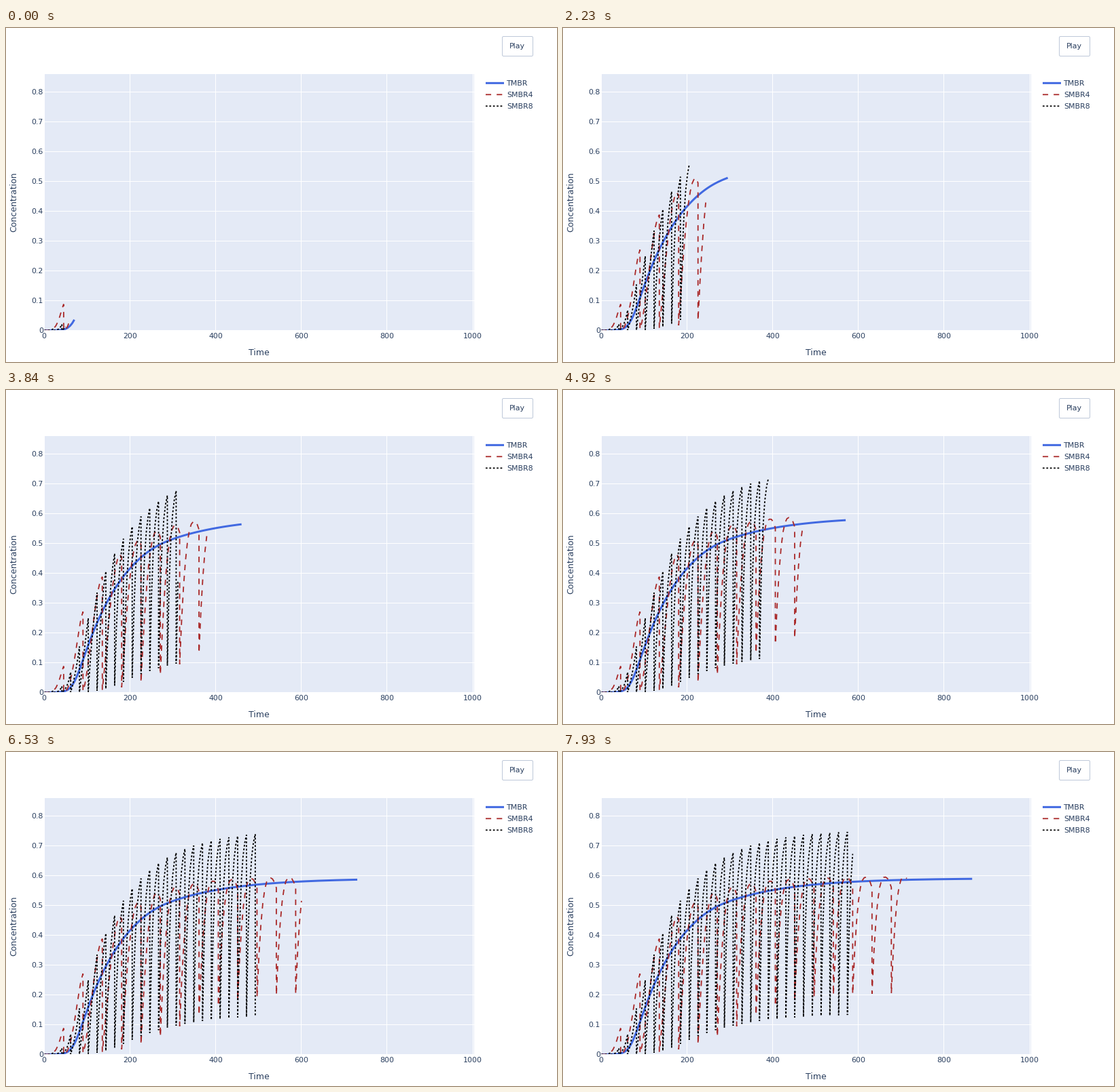
Recreate the animation shown at these times as a matplotlib script. Size 811 px wide and 493 px high, loop 8000 ms.

```python
import numpy as np
import matplotlib.pyplot as plt
from matplotlib.animation import FuncAnimation
from matplotlib.patches import FancyBboxPatch, Rectangle

W, H, DPI = 811, 493, 64
PT = 72 / DPI                # points per pixel
LOOP, TICKS, STEPS = 8000, 400, 104
INK = "#2a3f5f"
ZOOM = 0.9                   # page zoom
LEFT, TOP, RIGHT, BOTTOM = 56, 68, 689, 446

plt.rcParams["font.family"] = "DejaVu Sans"
fig = plt.figure(figsize=(W / DPI, H / DPI), dpi=DPI, facecolor="white")
ax = fig.add_axes([0, 0, 1, 1])
ax.set_xlim(0, W)
ax.set_ylim(H, 0)
ax.axis("off")


def px(t):
    return 56.4 + 0.631 * t


def py(v):
    return 446.4 - 440 * v


def label(x, y, s, size=11, va="baseline", **kw):
    ax.text(x, y, s, fontsize=size * PT, color=INK, va=va, **kw)


def ramp(x, width):
    """Zero, then a straight rise, with a rounded corner at x = 0."""
    return width * np.logaddexp(0, x / width)


def settle(x):
    return 1 - np.exp(-x)


# ---- data ----
def steady_curve():
    t = np.arange(0, 901, 5.0)
    return t, 0.591 * settle(0.0093 * ramp(t - 69, 9) - 0.0028 * ramp(t - 265, 15))


def cycles(period, steps, count, shape):
    """Repeated fill cycles, each ending in a sudden drop."""
    s = np.linspace(0, 1, steps + 1)
    cycle = range(1, count + 1)
    return (np.concatenate([(m - 1 + s) * period for m in cycle]),
            np.concatenate([shape(m, s) for m in cycle]))


def shape4(m, s):
    """S-shaped rise to a peak that comes earlier each cycle, then a sag."""
    high = 0.596 - 0.508 * 0.64 ** (m - 1)
    low = 0.205 / (1 + np.exp((8.2 - m) / 1.35)) if m > 2 else 0
    late = max(m - 3, 0)
    peak = 0.66 + 0.34 * np.exp(-late / 4.5)
    sag = 0.036 * settle(late / 3.5)
    bend = 1 + 3 * np.exp(-0.95 * (m - 1))
    power = 2.8 - 1.4 * np.exp(-(m / 5.5) ** 2)
    rise = 1 - (1 - np.minimum(s / peak, 1) ** bend) ** power
    fall = np.maximum(s - peak, 0) / (1.0001 - peak)
    return low + (high - low) * rise - sag * fall ** 2


def shape8(m, s):
    """Exponential rise, convex in early cycles and concave later."""
    high = 0.753 * settle(0.189 * ramp(m - 2.9, 0.65))
    low = 0.138 * settle(0.155 * ramp(m - 8.2, 1))
    a = 3 - 9 * np.exp((1 - m) / 3.5)
    return low + (high - low) * settle(a * s) / settle(a)


curves = [(px(t), py(v)) for t, v in (steady_curve(),
                                      cycles(45.1, 10, 16, shape4),
                                      cycles(20.5, 5, 29, shape8))]

# ---- plot area ----
area = dict(xy=(LEFT, TOP), width=RIGHT - LEFT, height=BOTTOM - TOP)
ax.add_patch(Rectangle(**area, fc="#e4eaf6", lw=0))
times = np.arange(0, 1001, 200)
levels = np.arange(9)
grid = dict(color="white", lw=PT, snap=False, zorder=1.5)
ax.vlines(np.floor(px(times) - 0.35) + 0.5, TOP, BOTTOM, **grid)
ax.hlines(446.5 - 44 * levels[1:], LEFT, RIGHT, **grid)
for t in times:
    label(px(t) - 0.3, 458.3, str(t), ha="center")
for k in levels:
    label(55, 450.2 - 44 * k, f"{k / 10:g}", ha="right")
label(372.6, 483, "Time", 12.5, ha="center")
label(11.5, 257, "Concentration", 12.5, va="center", ha="center", rotation=90)

# ---- button ----
ax.add_patch(FancyBboxPatch((730.5, 12.5), 45, 29, fc="white", ec="#bec8d9", lw=PT,
                            boxstyle="round,pad=0,rounding_size=1.8"))
label(740.7, 30.3, "Play")

# ---- traces and legend ----
styles = [("TMBR", "royalblue", 3, None),
          ("SMBR4", "#a92828", 2 * ZOOM, 9 * ZOOM),
          ("SMBR8", "black", 2 * ZOOM, 3 * ZOOM)]
clip = Rectangle(**area, transform=ax.transData)
lines = []
for n, (name, color, width, dash) in enumerate(styles):
    look = dict(color=color, lw=width * PT, snap=False, solid_capstyle="butt",
                dash_capstyle="butt", dash_joinstyle="bevel", zorder=3 + n)
    if dash:
        look["dashes"] = (dash / width, dash / width)
    y = 81.3 + 17 * n
    ax.plot([706, 733], [y, y], **look)
    label(737, y + 3.9, name)
    line, = ax.plot([], [], **look)
    line.set_clip_path(clip)
    lines.append(line)


def draw(tick):
    k = int((tick + 0.95) * STEPS / TICKS)
    # slightly uneven pace: one extra sample every other 11 steps
    wobble = 0.5 * np.cos(np.pi * k / 11) * np.tanh(k)
    n = int(17 * k / 11 + 0.85 + wobble)
    lasts = (14 + n, 14 + n, int(14.7 + 0.985 * n))
    for line, (x, y), last in zip(lines, curves, lasts):
        line.set_data(x[:last + 1], y[:last + 1])
    return lines


anim = FuncAnimation(fig, draw, frames=TICKS, init_func=lambda: draw(0),
                     interval=LOOP / TICKS, repeat=True, repeat_delay=0)
plt.show()
```
